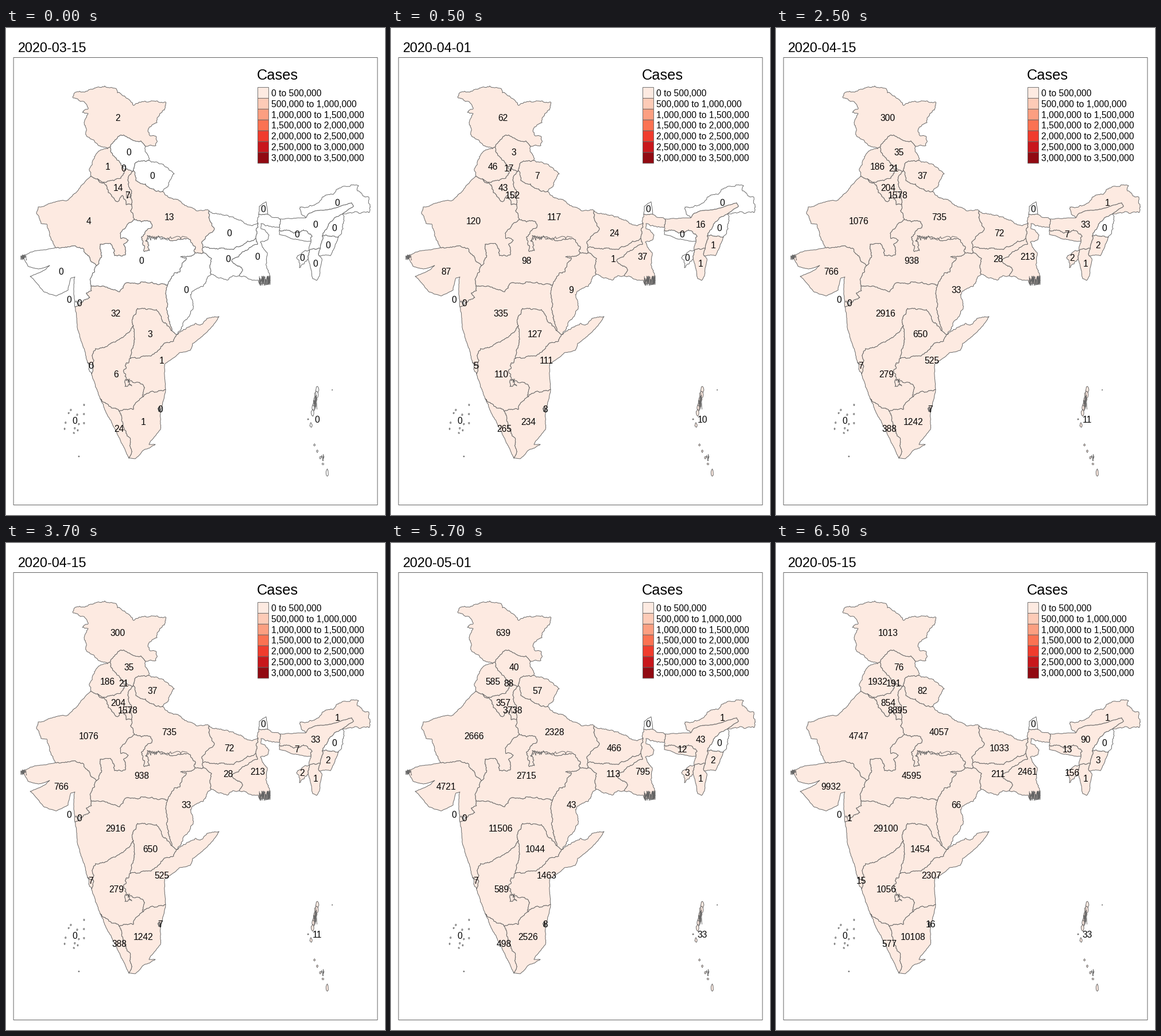
A matplotlib script for the animation above (8000 ms loop, 660 by 849 pixels).

```python
import math
import random

import matplotlib.pyplot as plt
from matplotlib.animation import FuncAnimation
from matplotlib.patches import Polygon, Rectangle

W, H, DPI = 660, 849, 72  # at 72 dpi one point is one pixel
LINE = "#646464"
REDS = ["#fdeae1", "#fdcbb7", "#fc9f81", "#fb7252", "#f03c2d", "#c8171c", "#910a12"]
DATES = [f"2020-{day}" for day in ("03-15", "04-01", "04-15", "05-01", "05-15")]
STEP = 500_000
JAGGED, SMOOTH = 0.4, 0.16

plt.rcParams["font.family"] = "Liberation Sans"
rng = random.Random(7)

fig = plt.figure(figsize=((W + 0.01) / DPI, (H + 0.01) / DPI), dpi=DPI, facecolor="white")
ax = fig.add_axes([0, 0, 1, 1])
ax.set(xlim=(0, W), ylim=(H, 0))
ax.axis("off")

borders = {}
regions = []


def fracture(p, q, rough):
    """Midpoint displacement from p to q, leaving out q."""
    dx, dy = q[0] - p[0], q[1] - p[1]
    d = math.hypot(dx, dy)
    if d < 2.5:
        return [p]
    k = rng.uniform(-rough, rough) * d ** -0.4
    mid = ((p[0] + q[0]) / 2 - dy * k, (p[1] + q[1]) / 2 + dx * k)
    return fracture(p, mid, rough) + fracture(mid, q, rough)


def border(name, *xy, rough=JAGGED):
    pts = list(zip(xy[::2], xy[1::2]))
    line = []
    for p, q in zip(pts, pts[1:]):
        line += fracture(p, q, rough)
    borders[name] = line + [pts[-1]]


def gap(p, line):
    return min(math.dist(p, line[0]), math.dist(p, line[-1]))


def ring(names):
    """Chain borders into one outline, turning each to fit."""
    path, *rest = [borders[n] for n in names.split()]
    if gap(path[0], rest[0]) < gap(path[-1], rest[0]):
        path = path[::-1]
    for line in rest:
        turned = math.dist(path[-1], line[-1]) < math.dist(path[-1], line[0])
        path = path + (line[::-1] if turned else line)
    return path


def islet(x, y, w, h, n=9):
    pts = []
    for i in range(n):
        a, r = math.tau * i / n, rng.uniform(0.65, 1.2) / 2
        pts.append((x + w * r * math.cos(a), y + h * r * math.sin(a)))
    return pts


def region(outlines, x, y, *counts):
    """A state by its border names or outlines, with its label and cases by date."""
    if isinstance(outlines, str):
        outlines = [ring(outlines)]
    shapes = [ax.add_patch(Polygon(o, ec=LINE, fc="white", lw=0.95, joinstyle="round"))
              for o in outlines]
    label = ax.text(x, y + 5.4, "", size=15.6, ha="center", va="baseline", zorder=5)
    regions.append((shapes, label, counts or [0] * len(DATES)))


def tangle(x, y, w, h, n):
    """Dense scribble where a broken coast merges into grey."""
    pts = sorted((x + w * rng.random(), y + h * rng.random()) for _ in range(n))
    ax.plot(*zip(*pts), color=LINE, lw=0.9, zorder=2)


# North
border("jk_n", 181, 208, 168, 207, 140, 187, 136, 165, 143, 149, 133, 147, 143, 141, 138, 131,
       117, 122, 121, 112, 150, 107, 172, 101, 190, 105, 194, 113, 222, 135, 278, 129, 276, 143,
       263, 158, 263, 165, 247, 179, 250, 187, 262, 190, 261, 205, 243, 206)
border("jk_hp", 181, 208, 190, 195, 199, 187, 221, 196, 235, 197, 243, 206)
border("hp_e", 243, 206, 249, 231)
border("hp_uk", 249, 231, 224, 237, 222, 249)
border("hp_hr", 222, 249, 209, 246)
border("hp_pb", 181, 208, 193, 230, 209, 246)
border("uk_e", 249, 231, 268, 237, 293, 254, 272, 285)
border("uk_up", 272, 285, 262, 285, 243, 272, 226, 266, 222, 249)
border("pb_w", 181, 208, 163, 214, 145, 246, 147, 259)
border("pb_rj", 147, 259, 159, 263)
border("pb_hr", 159, 263, 175, 269, 200, 262, 209, 246)
border("hr_rj", 159, 263, 175, 274, 178, 287, 194, 303, 203, 292, 209, 308, 219, 307)
border("hr_up", 222, 249, 212, 265, 219, 307)
border("rj_w", 147, 259, 133, 273, 106, 301, 56, 312, 53, 322, 61, 341, 71, 342, 86, 383,
       rough=0.25)
border("rj_up", 219, 307, 217, 318, 224, 334)

# Ganges plain
border("up_n", 272, 285, 306, 304, 318, 312, 354, 319)
border("up_br", 354, 319, 353, 330, 363, 350, 341, 375, 343, 383)
border("up_jh", 343, 383, 343, 392)
border("up_cg", 343, 392, 329, 392)
border("up_mp", 224, 334, 249, 337, 254, 346, 236, 364, 241, 390, 250, 388, 243, 371, 246, 362,
       277, 367, 318, 368, 330, 383, 329, 392, rough=0.55)
border("br_n", 354, 319, 370, 324, 420, 343, 439, 340)
border("br_wb", 439, 340, 435, 367)
border("br_jh", 435, 367, 409, 380, 385, 386, 343, 383)
border("jh_wb", 435, 367, 438, 377, 393, 406, 411, 420, 406, 432)
border("jh_s", 406, 432, 397, 432, 388, 438, 357, 429)
border("jh_cg", 343, 392, 358, 402, 357, 429)

# East
border("wb_nw", 439, 340, 440, 325)
border("sk_wb", 440, 325, 456, 325)
border("sk_n", 440, 325, 441, 311, 453, 303, 456, 325, rough=SMOOTH)
border("wb_ne", 456, 325, 477, 333)
border("as_wb", 477, 333, 476, 347)
border("wb_e", 476, 347, 444, 341, 444, 350, 458, 361, 456, 369, 443, 373, 455, 392, 460, 447,
       442, 447, 440, 440)
border("wb_sw", 440, 440, 424, 438, 406, 432)
border("as_n", 477, 333, 522, 331, rough=SMOOTH)
border("as_ar", 522, 331, 528, 323, 563, 316, 602, 305, 605, 311, 586, 324, rough=SMOOTH)
border("as_nl", 586, 324, 567, 337, 551, 362)
border("as_mn", 551, 362, 547, 384)
border("as_mz", 547, 384, 528, 388)
border("as_s", 528, 388, 531, 372)
border("as_ml", 531, 372, 533, 363, 518, 352, 476, 353)
border("as_w", 476, 347, 476, 353)
border("ml_s", 476, 353, 476, 360, 500, 368, 531, 372, rough=SMOOTH)
border("ar_n", 522, 331, 514, 324, 512, 312, 537, 309, 557, 291, 570, 290, 580, 279, 614, 275,
       612, 284, 632, 295, 632, 322, 604, 322, 586, 324)
border("nl_e", 586, 324, 587, 350, 579, 364)
border("mn_nl", 579, 364, 551, 362)
border("mn_e", 579, 364, 565, 397, 545, 397, rough=SMOOTH)
border("mn_mz", 547, 384, 545, 397)
border("mz_s", 545, 397, 550, 402, 546, 432, 541, 440, 534, 437, 526, 403, rough=SMOOTH)
border("tr_mz", 528, 388, 526, 403)
border("tr_w", 528, 388, 518, 390, 506, 400, 511, 418, 526, 403)

# Centre and west
border("rj_gj", 86, 383, 121, 380, 135, 385, 157, 415)
border("rj_mp", 157, 415, 167, 397, 164, 377, 184, 378, 189, 397, 207, 396, 206, 376, 213, 370,
       200, 367, 199, 358, 224, 334, rough=0.5)
border("gj_mp", 157, 415, 148, 450)
border("gj_mh", 148, 450, 149, 458, 140, 462, 146, 470, 128, 483, 120, 486)
border("gj_coast", 86, 383, 42, 391, 27, 398, 38, 415, 56, 420, 76, 414, 70, 420, 42, 433,
       66, 460, 88, 467, 108, 457, 113, 436, 120, 434, 118, 447, 120, 486, rough=SMOOTH)
border("mp_cg", 329, 392, 304, 399, 314, 401, 303, 425, 293, 427, 281, 449)
border("mp_mh", 148, 450, 161, 450, 198, 460, 208, 445, 281, 449)
border("mh_cg", 281, 449, 281, 486, 289, 528)
border("cg_e", 357, 429, 344, 450, 321, 465, 326, 488, 310, 511, 297, 535)
border("mh_coast", 120, 486, 129, 540, 142, 583, rough=SMOOTH)
border("goa_coast", 142, 583, 149, 603)
border("goa_mh", 142, 583, 152, 588)
border("goa_ka", 152, 588, 149, 603)

# South
border("mh_ka", 152, 588, 150, 571, 156, 559, 179, 552, 203, 540, 222, 519)
border("mh_tg", 222, 519, 220, 508, 229, 489, 262, 491, 272, 511, 289, 528)
border("tg_cg", 289, 528, 297, 535)
border("tg_ap", 297, 535, 292, 546, 270, 555, 247, 572, 217, 576)
border("tg_ka", 222, 519, 219, 560, 217, 576)
border("ap_ka", 217, 576, 205, 596, 207, 625, 219, 624, 212, 613, 240, 625, 239, 643, rough=0.55)
border("ap_n", 297, 535, 331, 515, 338, 518, 350, 506, 371, 503)
border("ap_coast", 371, 503, 356, 524, 325, 550, 321, 562, 302, 566, 276, 587, 278, 630,
       rough=SMOOTH)
border("ap_tn", 239, 643, 257, 634, 278, 630)
border("tn_coast", 278, 630, 269, 672, 269, 700, 249, 726, 260, 726, 238, 737, 225, 751, 214, 750,
       rough=SMOOTH)
border("tn_kl", 214, 750, 217, 722, 204, 690, 197, 668)
border("ka_tn", 197, 668, 222, 665, 225, 655, 239, 643)
border("ka_kl", 164, 646, 197, 668)
border("ka_coast", 149, 603, 164, 646, rough=SMOOTH)
border("kl_coast", 164, 646, 185, 690, 214, 750, rough=SMOOTH)

region("jk_n jk_hp", 195, 157, 2, 62, 300, 639, 1013)
region("jk_hp hp_e hp_uk hp_hr hp_pb", 214, 217, 0, 3, 35, 40, 76)
region("pb_w hp_pb pb_hr pb_rj", 177, 242, 1, 46, 186, 585, 1932)
region("uk_e hp_uk uk_up", 255, 258, 0, 7, 37, 57, 82)
region("pb_hr hp_hr hr_up hr_rj", 195, 279, 14, 43, 204, 357, 854)
region("pb_rj hr_rj rj_up rj_mp rj_gj rj_w", 144, 337, 4, 120, 1076, 2666, 4747)
region("uk_up hr_up rj_up up_mp up_cg up_jh up_br up_n", 284, 330, 13, 117, 735, 2328, 4057)
region([islet(206, 244, 5, 6)], 205, 245, 0, 17, 21, 88, 191)
region([islet(213, 291, 9, 12)], 212, 292, 7, 152, 1578, 3738, 8895)
region("br_n br_wb br_jh up_br", 389, 358, 0, 24, 72, 466, 1033)
region("sk_n sk_wb", 448, 316)
region("ar_n as_ar", 577, 305, 0, 0, 1, 1, 1)
region("as_n as_ar as_nl as_mn as_mz as_s as_ml as_w as_wb", 539, 343, 0, 16, 33, 43, 90)
region("nl_e mn_nl as_nl", 572, 349)
region("mn_nl mn_e mn_mz as_mn", 561, 379, 0, 1, 2, 2, 3)
region("as_mz mn_mz mz_s tr_mz", 539, 411, 0, 1, 1, 1, 1)
region("tr_mz tr_w", 516, 401, 0, 0, 2, 3, 156)
region("as_ml ml_s", 507, 360, 0, 0, 7, 12, 13)
region("br_wb jh_wb wb_sw wb_e as_wb wb_ne sk_wb wb_nw", 438, 399, 0, 37, 213, 795, 2461)
region("br_jh jh_wb jh_s jh_cg up_jh", 387, 403, 0, 1, 28, 113, 211)
region("up_cg jh_cg cg_e tg_cg mh_cg mp_cg", 314, 457, 0, 9, 33, 43, 66)
region("rj_mp up_mp mp_cg mp_mh gj_mp", 236, 406, 0, 98, 938, 2715, 4595)
region("rj_gj gj_mp gj_mh gj_coast", 96, 425, 0, 87, 766, 4721, 9932)
region([islet(127, 480, 6, 8)], 128, 480, 0, 0, 0, 0, 1)
region("mp_mh mh_cg mh_tg mh_ka goa_mh mh_coast gj_mh", 191, 498, 32, 335, 2916, 11506, 29100)
region("mh_tg tg_cg tg_ap tg_ka", 251, 534, 3, 127, 650, 1044, 1454)
region("tg_ap ap_n ap_coast ap_tn ap_ka", 271, 580, 1, 111, 525, 1463, 2307)
region("mh_ka tg_ka ap_ka ka_tn ka_kl ka_coast goa_ka", 192, 604, 6, 110, 279, 589, 1056)
region("goa_coast goa_ka goa_mh", 148, 589, 0, 5, 7, 7, 15)
region("ka_kl tn_kl kl_coast", 197, 699, 24, 265, 388, 498, 577)
region("ap_tn tn_coast tn_kl ka_tn", 239, 687, 1, 234, 1242, 2526, 10108)
region([islet(267, 665, 5, 8)], 269, 665, 0, 3, 7, 8, 16)

# Islands: scattered atolls, and a chain that thins out southwards
region([islet(122, 477, 2, 2)], 110, 474)
region([islet(rng.uniform(100, 148), rng.uniform(655, 708), 2.2, 2.8) for _ in range(12)]
       + [islet(127, 747, 2, 2)], 120, 685)
chain = [islet(542 - 1.6 * i, 631 + 8 * i, 6, 12) for i in range(6)]
chain += [islet(531, 692, 4, 9), islet(568, 631, 1, 1), islet(526, 682, 2, 2)]
chain += [islet(537 + 5 * i, 727 + 11 * i, 3, 4) for i in range(4)]
chain += [islet(559, 775, 5, 12)]
region(chain, 542, 683, 0, 10, 11, 33, 33)

tangle(26, 395, 10, 10, 28)
tangle(441, 432, 19, 17, 90)
tangle(245, 362, 73, 8, 36)
tangle(209, 611, 8, 8, 9)
tangle(265, 660, 6, 9, 10)
tangle(536, 636, 7, 30, 14)
tangle(549, 743, 5, 13, 10)

# Frame, title and legend
ax.add_patch(Rectangle((13.1, 51.5), 633.8, 780, fc="none", ec=LINE, lw=1, snap=False))
title = ax.text(20.8, 42.4, "", size=23.4)
ax.text(437, 89.6, "Cases", size=25.4)
for i, red in enumerate(REDS):
    top = 103.6 + 18.9 * i
    ax.add_patch(Rectangle((438.5, top), 18.9, 18.9, fc=red, ec=LINE, lw=0.9, snap=False))
    ax.text(461.8, top + 15.1, f"{i * STEP:,} to {(i + 1) * STEP:,}", size=15.6)


def update(frame):
    step = (frame + 3) // 4  # the first date shows for one tick, the others for four
    title.set_text(DATES[step])
    for shapes, label, counts in regions:
        n = counts[step]
        label.set_text(str(n))
        for shape in shapes:
            shape.set_facecolor(REDS[n // STEP] if n else "white")
    return []


anim = FuncAnimation(fig, update, frames=16, interval=500, repeat=True, repeat_delay=0)
plt.show()
```
